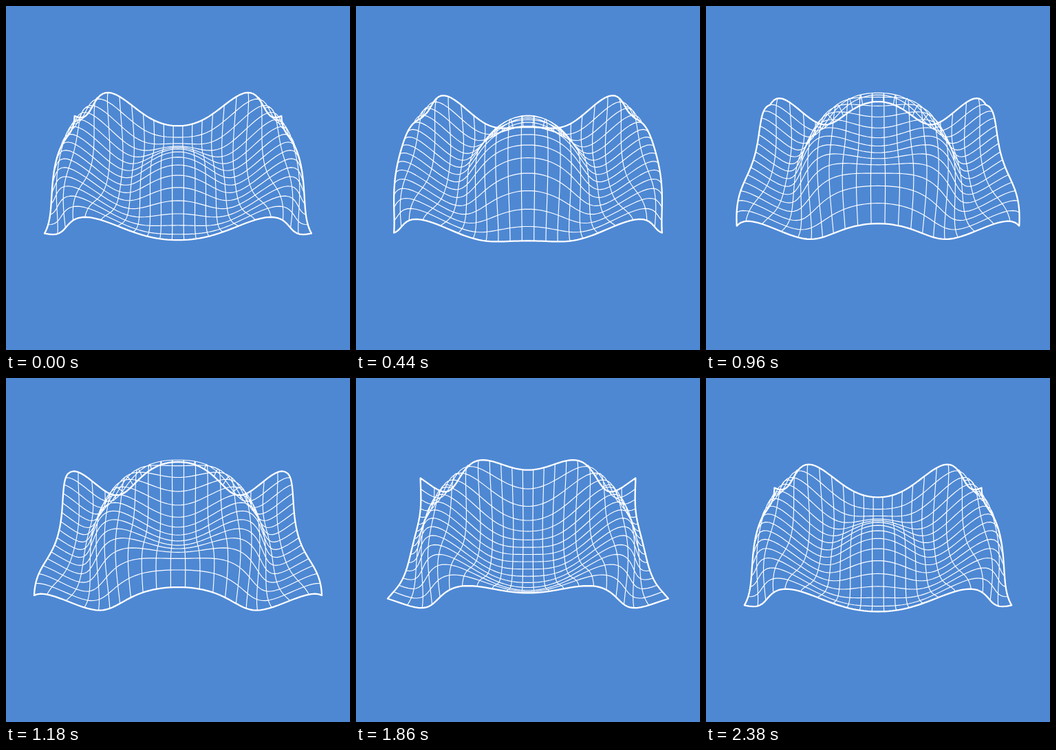
Animation of 500x500 px, one loop 2.4 s. Source, as an HTML page:

```html
<!DOCTYPE html>
<html lang="en">
<head>
<meta charset="utf-8">
<title>Rippling sheet</title>
<style>
  html, body { margin: 0; width: 100%; height: 100%; overflow: hidden; background: #4e88d3; }
  svg { display: block; width: 100%; height: 100%; }
  path { fill: none; stroke: #fff; stroke-linecap: round; stroke-linejoin: round; }
</style>
</head>
<body>
<svg viewBox="0 0 500 500">
  <path id="mesh" stroke-width="1.15"/>
  <path id="rim" stroke-width="2.3"/>
</svg>
<script>
const LOOP = 2400;
const COLS = 21, ROWS = 15, STEPS = 72;
const mesh = document.getElementById('mesh');
const rim = document.getElementById('rim');

// Height of the ripple; u and v run from -1 to 1 across and front to back.
function height(u, v, angle) {
  const r2 = u * u + 0.36 * v * v;
  return 2.55 * Math.exp(-r2) * Math.sin(angle - 6.126 * r2);
}

// Tilted perspective view of a point on the sheet.
function project(u, v, angle) {
  const h = height(u, v, angle);
  const scale = 1 / (0.06 - 0.00785 * v - 0.0034 * h);
  const x = 250 + 10.5 * u * scale;
  const y = 225 + (5.13 * v - h) * scale;
  return x.toFixed(2) + ' ' + y.toFixed(2);
}

function line(pointAt) {
  const pts = [];
  for (let i = 0; i <= STEPS; i++) pts.push(pointAt(2 * i / STEPS - 1));
  return 'M' + pts.join('L');
}

function draw(ms) {
  const angle = 2 * Math.PI * (ms % LOOP) / LOOP;
  const column = u => line(v => project(u, v, angle));
  const row = v => line(u => project(u, v, angle));
  let d = '';
  for (let i = 1; i < COLS; i++) d += column(2 * i / COLS - 1);
  for (let j = 1; j < ROWS; j++) d += row(2 * j / ROWS - 1);
  mesh.setAttribute('d', d);
  rim.setAttribute('d', column(-1) + column(1) + row(-1) + row(1));
}

const start = performance.now();
function tick() {
  draw(performance.now() - start);
  requestAnimationFrame(tick);
}
draw(0);
requestAnimationFrame(tick);
</script>
</body>
</html>
```
